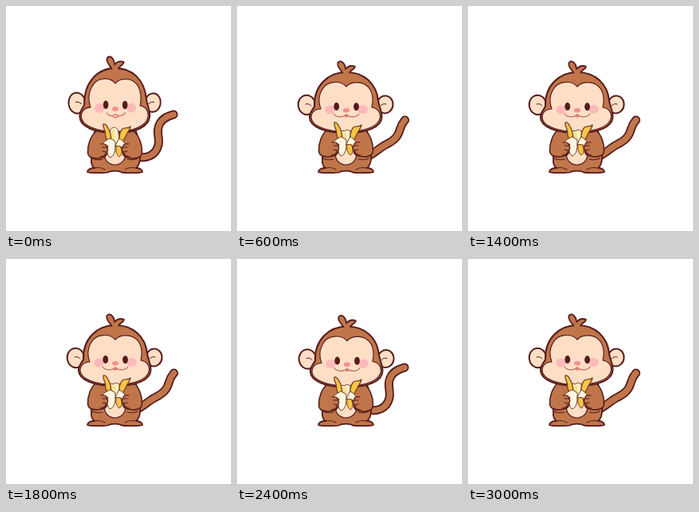
Recreate the animation shown at these times as an HTML page with a canvas. Size 282x282 px, loop 3200 ms.

```html
<!DOCTYPE html>
<html lang="en">
<head>
<meta charset="utf-8">
<title>Monkey eating a banana</title>
<style>
html, body { margin: 0; width: 100%; height: 100%; overflow: hidden; background: #fff; }
canvas { display: block; width: 100vw; height: 100vh; }
</style>
</head>
<body>
<canvas id="stage"></canvas>
<script>
const SIZE = 282, STEP = 200, STEPS = 16;
const canvas = document.getElementById('stage');
const ctx = canvas.getContext('2d');

const INK = '#561c1d', FUR = '#c0764a', SKIN = '#fedfc6', PINK = '#fcb9ba';
const YELLOW = '#f6c544', FLESH = '#fff0c4', PEEL = '#fff6e2', RIND = '#70402a';

function shape(d, fill, line = 1.8, ink = INK) {
  const p = new Path2D(d);
  if (fill) { ctx.fillStyle = fill; ctx.fill(p); }
  if (line) { ctx.strokeStyle = ink; ctx.lineWidth = line; ctx.stroke(p); }
}

function oval(x, y, rx, ry, fill, line = 0, turn = 0) {
  ctx.beginPath();
  ctx.ellipse(x, y, rx, ry, turn, 0, Math.PI * 2);
  ctx.fillStyle = fill;
  ctx.fill();
  if (line) { ctx.strokeStyle = INK; ctx.lineWidth = line; ctx.stroke(); }
}

function moved(dx, dy, draw) {
  ctx.save();
  ctx.translate(dx, dy);
  draw();
  ctx.restore();
}

// Run draw() scaled about a fixed point.
function scaled(x, y, sx, sy, draw) {
  ctx.save();
  ctx.translate(x, y);
  ctx.scale(sx, sy);
  ctx.translate(-x, -y);
  draw();
  ctx.restore();
}

// Draw once as is and once mirrored about the body's middle.
function both(draw) {
  draw();
  scaled(136.5, 0, -1, 1, draw);
}

const TAILS = {
  curled: 'M160 188 C176 193 188 187 191 174 C193 164 187 157 193 147 C197 140 204 138 210 136',
  middle: 'M160 190 C169 188 179 177 188 173 C198 168 202 163 204.5 154 C206 148 208 146 210.5 143',
  wide: 'M160 189 C171 188 181 179 192 177 C204 175 211 168 213 160 C214 155 216 151 217.5 148'
};
// Each swing position also moves the arms and the banana.
const SWING = [
  { kind: 'curled', lift: 2 },
  { kind: 'middle', lift: 0 },
  { kind: 'wide', lift: -1 },
  { kind: 'middle', lift: 0 }
];

function tail(kind) {
  shape(TAILS[kind], null, 11);
  shape(TAILS[kind], null, 7.4, FUR);
}

function torso() {
  shape('M112 154 C108 170 106 185 107 192 C106 198 109 202 111 203 C106 203 102 205 102 208 ' +
    'C104 209.5 124 209.5 128 208.5 C131 206 142 206 145 208.5 C150 209.5 168 209.5 171 208 ' +
    'C171 205 167 203 163 203 C167 200 168 195 168 190 C169 178 166 165 162 154 Z', FUR);
  oval(136.5, 187, 13, 12, SKIN, 1.2);
  both(() => shape('M111 203 C116 202 121 203 124 205 M108 191 C112 193 117 193 121 192', null, 1.1));
}

function arms() {
  both(() => shape('M113 155 C106 161 102 172 102.5 182 C103 189 113 190 120 188 ' +
    'C126 187 128 182 127 177 C126 173 123 171 120 171', FUR, 1.6));
}

function banana(whole) {
  if (whole) {
    shape('M130 174 L130 157 C130 148 141 148 141 157 L143 174 Z', FLESH, 1, RIND);
    shape('M131 172 L131.5 157 C132 151 136 151 136 156 L136 172 Z', '#fae093', 0);
  } else {
    shape('M130 173 L130 157 C132 155 134 158 136 156 C138 154 140 157 142 156 L143 173 Z', FLESH, 1, RIND);
    shape('M131 171 L131 159 C133 158 135 160 137 158 L137 171 Z', '#fae093', 0);
  }
  shape('M122 146 C126 145 127 150 129 153 C132 159 132 166 131 172 C126 168 124.5 163 124.5 157 C124 153 121 150 122 146 Z', YELLOW, 1.3, RIND);
  shape('M156 149 C153 152 149 150 146 152 C142 156 141 165 142 172 C147 168 149 164 151 159 C153 155 155 154 156 149 Z', YELLOW, 1.3, RIND);
  shape('M130 164 C124 167 118 171 120 177 C124 176 126 173 128 173 C126 179 127 185 130 188 ' +
    'C135 187 137 181 137 174 L137 168 Z', PEEL, 1, RIND);
  shape('M142 164 C148 167 151 172 150 178 C147 177 146 174 143 174 L137 174 Z', PEEL, 1, RIND);
  shape('M138 174 C137 179 139 185 142 187 C146 185 146 178 143 174 Z', YELLOW, 1, RIND);
}

function fingers() {
  both(() => {
    shape('M118 171 C123 170 127 172 126 175 C129 177 128 180 125 181 C126 184 122 187 118 186 Z', FUR, 0);
    shape('M119 171 C124 170 127 172 126 175 C129 177 128 180 125 181 C126 184 122 187 118 187 ' +
      'M121 175 L126 175 M121 180 L125 181', null, 1.2);
  });
}

function head(eating) {
  oval(87.5, 124, 10.8, 12.2, SKIN, 1.9, -0.15);
  oval(185.5, 123.5, 10, 11, SKIN, 1.9, 0.15);
  shape('M86 123 C89 122 91 123 93 125 M187 123 C184 122 182 123 180 125', null, 1);
  shape('M134 85 C130 81 124.5 75 126.5 71 C129.5 67 135.5 71 136 79 C139 75 144 74 148 76 C147 80 142 80 140 85', FUR);
  shape('M137 83 C159 83 175 97 177 119 C178 126 181.5 131 181.5 139 C181 152 163 159 137 159 ' +
    'C111 159 91.5 152 91 140 C90.5 134 95 130 97 126 C96 100 114 83 137 83 Z', FUR, 2);
  shape('M134 85 L131 79 L136 80 L141 80 L140 85 Z', FUR, 0);
  shape('M137 101 C143 94 160 93 167 105 C172 114 170 122 169 127 C176 128 180 133 179.5 139 ' +
    'C178 151 160 157.6 137 157.6 C112 157.6 93.5 150 93 140 C93 133 98 129 105 129 ' +
    'C102 121 102 113 106 106 C112 93 130 93 137 101 Z', SKIN, 1.2);
  oval(116.5, 130, 6.2, 5.6, PINK);
  oval(157.5, 129.5, 6.2, 5.6, PINK);
  oval(124.7, 126, 3.4, 5, INK);
  oval(149.5, 126.2, 3.4, 5, INK);
  oval(137, 130.8, 4.1, 2.7, '#f78f90');
  if (eating) {
    shape('M132 138 C135 141 140 141 143 138 C141 143 134 143 132 138 Z', '#ee6969', 0);
    shape('M126 135 C128 140 134 140 137 137 C140 140 147 140 150 135', null, 1.2, '#d5706c');
  } else {
    shape('M121 135 C124 140 133 140 137 136 C141 140 150 140 153 135', null, 1.1, '#b8695e');
    oval(137, 138.6, 1.8, 1.2, '#e86d6d');
  }
}

function pose(step) {
  const { kind, lift } = SWING[step % 4];
  const whole = step === 0;
  const chewing = step === 1 || step % 2 === 0;

  tail(kind);
  torso();
  moved(0, lift, arms);
  if (whole) scaled(137, 159, 0.97, 1.067, () => head(true));
  else moved(chewing ? 1 : 0, chewing ? 1.5 : 0, () => head(false));
  moved(0, lift, () => {
    banana(whole);
    fingers();
  });
}

function draw(now) {
  const w = Math.round(innerWidth * devicePixelRatio);
  const h = Math.round(innerHeight * devicePixelRatio);
  if (canvas.width !== w || canvas.height !== h) {
    canvas.width = w;
    canvas.height = h;
  }
  ctx.setTransform(w / SIZE, 0, 0, h / SIZE, 0, 0);
  ctx.fillStyle = '#fff';
  ctx.fillRect(0, 0, SIZE, SIZE);
  ctx.lineCap = ctx.lineJoin = 'round';
  pose(Math.floor(now / STEP) % STEPS);
}

const start = performance.now();
function tick() {
  draw(performance.now() - start);
  requestAnimationFrame(tick);
}
tick();
</script>
</body>
</html>
```
